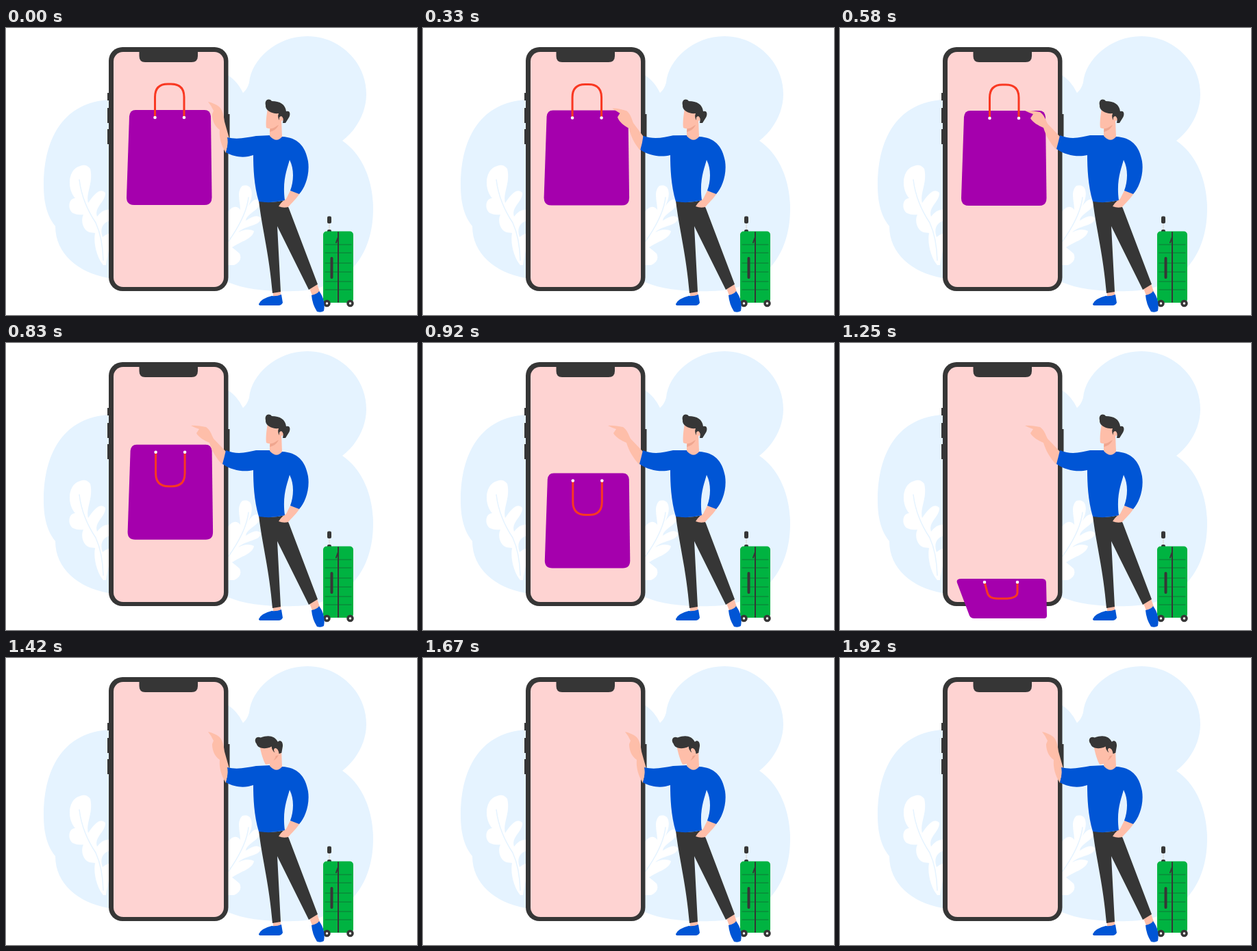
An HTML page for the animation above (2010 ms loop, 600 px wide and 420 px high).

```html
<!DOCTYPE html>
<html lang="en">
<head>
<meta charset="utf-8">
<title>Shopping bag</title>
<style>
  html, body { margin: 0; width: 100%; height: 100%; overflow: hidden; background: #fff; }
  svg { display: block; width: 600px; height: 420px; }
  .dark { fill: #363636; }
  .skin { fill: #febea9; }
  .blue { fill: #0055d5; }
  .white { fill: #fff; }
  .line { fill: none; stroke-linecap: round; stroke-linejoin: round; }
</style>
</head>
<body>
<svg viewBox="0 0 600 420">
  <defs>
    <marker id="hole" markerUnits="userSpaceOnUse" markerWidth="6" markerHeight="6" refX="3" refY="3">
      <circle cx="3" cy="3" r="2.3" fill="#fff"/>
    </marker>
  </defs>

  <!-- backdrop and plants -->
  <path fill="#e5f3ff" d="M346 95Q336 74 318 66L150 105C87 109 55 157 55 231C55 260 62 278 72 290C72 330 105 358 150 366L324 372C350 383 385 386 420 385C498 384 536 333 536 264C536 220 518 183 491 165C513 148 526 122 526 97C526 50 487 12 440 12C395 12 358 46 355 80Q352 90 346 95Z"/>
  <path class="white" d="M108 202C91 206 88 234 101 249C90 250 90 266 98 271Q104 274 113 273C108 284 114 297 122 299L130 300C127 317 134 338 142 347L146 347C148 332 152 322 152 310V300Q146 302 141 306C136 292 143 284 152 282V266Q142 264 133 276C128 262 146 254 145 241Q136 231 120 256C116 242 128 226 123 206Q117 198 108 202Z"/>
  <path class="white" d="M345 231C336 240 342 254 342 266C336 258 328 262 322 272V347H333Q346 341 341 330Q334 324 330 321C343 312 360 309 362 297Q352 292 339 299C350 288 372 290 372 278Q366 271 350 282C352 270 374 266 370 253Q362 246 351 265C364 245 360 226 345 231Z"/>
  <path class="line" stroke="#e5f3ff" stroke-width="1.5" d="M107 222Q111 255 131 285Q141 307 142 340M354 248Q351 275 325 312"/>

  <!-- phone -->
  <path class="dark" d="M148 95h4v11h-4zM148 117h4v22h-4zM148 148h4v22h-4zM322 126h4.5v44h-4.5z"/>
  <rect class="dark" x="150" y="28" width="174.5" height="357" rx="20"/>
  <rect x="157" y="35" width="161" height="344" rx="14" fill="#fed3d2"/>
  <path class="dark" d="M194.5 34H280V41Q280 50 271 50H203Q194.5 50 194.5 41Z"/>

  <g id="bag">
    <path id="body" fill="#a500ad"/>
    <path id="handle" class="line" stroke="#f93822" stroke-width="3" marker-start="url(#hole)" marker-end="url(#hole)"/>
  </g>

  <!-- suitcase -->
  <path class="line" stroke="#dfe3e6" stroke-width="2" d="M472 286V296"/>
  <rect class="dark" x="469" y="275.5" width="6" height="10.5" rx="2"/>
  <rect class="dark" x="469" y="295" width="6" height="5" rx="2"/>
  <rect x="463" y="297.5" width="44" height="104.5" rx="5" fill="#00b341"/>
  <path class="line" stroke="#0a8a3a" stroke-width="1.3" d="M466 317H504M466 329H504M466 344H504M466 357H504M466 371H504M466 383H504"/>
  <path class="line" stroke="#363636" stroke-width="2" d="M485 299V401M485 306L482 314"/>
  <rect class="dark" x="473.5" y="335" width="4" height="32" rx="2"/>
  <g fill="#fff" stroke="#363636" stroke-width="3.5">
    <circle cx="468.5" cy="403" r="3.5"/><circle cx="502.5" cy="403" r="3.5"/>
  </g>

  <!-- person -->
  <path class="skin" d="M390 384H401V396H390ZM443 381L454 374L459 389L448 394Z"/>
  <path class="dark" d="M369 253Q388 257 407 252L413 264L455 375L442 383L396 290L401 386L389 388C384 330 375 300 369 253Z"/>
  <path class="blue" d="M369 404Q372 396 388 392Q395 393 402 390L404 402Q402 406 398 406H372Q369 406 369 404ZM446 391Q455 389 457 385C464 394 466 405 464 414Q460 417 454 415Q447 404 446 391Z"/>
  <path class="skin" d="M415 238L429 242C424 250 417 256 412 262Q405 264 398 261Q402 254 409 250Z"/>
  <path class="skin" id="hand"/>
  <path class="blue" id="shirt"/>
  <path class="skin" d="M385 145L402 133L403 159Q395 169 385 158Z"/>
  <path fill="#efa68f" d="M385 152Q394 150 398 142L386 146Z"/>
  <g id="head">
    <path class="skin" d="M382 118C380 129 379 140 380 146Q388 150 397 142L401 135C405 138 408 132 404 127L399 122Z"/>
    <path class="dark" d="M379 113C377 105 384 102 388 107C400 107 408 112 409 122C416 120 415 128 413 131L408 139L404 139Q406 131 402 129Q398 129 399 135Q396 130 398 125C389 126 378 121 379 113Z"/>
  </g>
</svg>

<script>
const LOOP = 2010, STEP = 1000 / 12;
const $ = id => document.getElementById(id);

const shapes = {
  bag: [
    "M189 120 H290 Q298 120 299 129 L300.5 248 Q300.5 259 290 259 H187 Q176 259 176 248 L180 129 Q181 120 189 120Z",
    "M175 202 H293 Q299 202 299 208 L300 256 Q300 260 296 260 H194 Q189 260 187 256 L169 208 Q167 202 175 202Z"
  ],
  handle: [
    "M217.5 131 L217.5 101 Q217.5 82 236 82 L241 82 Q260 82 260 101 L260 131",
    "M217 131 L217 162 Q217 181 236 181 L241 181 Q259.5 181 259.5 162 L259.5 131",
    "M209 207 L213 222 Q215 231 228 231 L242 231 Q257 230 257 222 L257 207"
  ],
  hand: [
    "M295 108 C300 109 308 112 312 116 C317 122 318 130 319 137 L326 162 L321 183 C314 172 311 160 312 149 C305 144 301 136 301 126 L303 121 Q300 114 295 108Z",
    "M270 121 C277 120 285 122 292 123 C298 127 300 134 303 140 L322 160 L316 178 C306 168 300 156 297 146 C290 143 281 138 278 132 L282 126 Q276 124 270 121Z"
  ],
  sleeve: [
    "M323 160 C338 164 352 160 365 158 L386 157",
    "M321 157 C337 164 352 160 365 157 L386 157"
  ],
  cuff: [
    "C350 190 335 190 321 182 Q325 170 323 160Z",
    "C348 189 330 187 316 177 Q319 166 321 157Z"
  ]
};
const torso = "Q394 166 403 159C425 160 437 172 441 195C444 215 436 235 428 243L415 238C420 225 421 206 414 193C411 205 403 222 407 252Q388 257 369 254C362 230 361 205 361 186";

const clamp = v => Math.min(1, Math.max(0, v));
const ramp = (k, from, to) => clamp((k - from) / (to - from));
const ease = v => v * v * (3 - 2 * v);

// Blend two paths that share the same commands.
function mix(a, b, t) {
  const ends = b.match(/[\d.]+/g);
  let i = 0;
  return a.replace(/[\d.]+/g, n => (+n + (ends[i++] - n) * t).toFixed(2));
}

function draw(now) {
  const k = Math.min(23, Math.floor((now % LOOP + 4.9) / STEP));

  const back = ramp(k, 15, 17);
  const reach = ease(ramp(k, 0, 6)) * (1 - back);
  $("hand").setAttribute("d", mix(...shapes.hand, reach));
  $("shirt").setAttribute("d", mix(...shapes.sleeve, reach) + torso + mix(...shapes.cuff, reach));
  $("head").setAttribute("transform", `translate(${2.5 * back} ${4 * back}) rotate(${-22 * back} 393 158)`);

  // The bag drops, then tips forward about its lower edge until it is flat.
  const angle = Math.max(0, k - 12) * 22 * Math.PI / 180;
  const fold = (1 - Math.cos(angle)) / (1 - Math.cos(66 * Math.PI / 180));
  const [up, down, folded] = shapes.handle;
  const dx = ramp(k, 0, 7) + ramp(k, 7, 12);
  const dy = ramp(k, 0, 7) + 142 * ramp(k, 7, 12) ** 3.2;
  $("bag").setAttribute("transform", `translate(${dx} ${dy})`);
  $("bag").setAttribute("visibility", k < 17 ? "visible" : "hidden");
  $("body").setAttribute("d", mix(...shapes.bag, fold));
  $("handle").setAttribute("d", k < 10 ? mix(up, down, ease(ramp(k, 7, 10))) : mix(down, folded, fold));
}

const start = performance.now();
function tick() {
  draw(performance.now() - start);
  requestAnimationFrame(tick);
}
tick();
</script>
</body>
</html>
```
